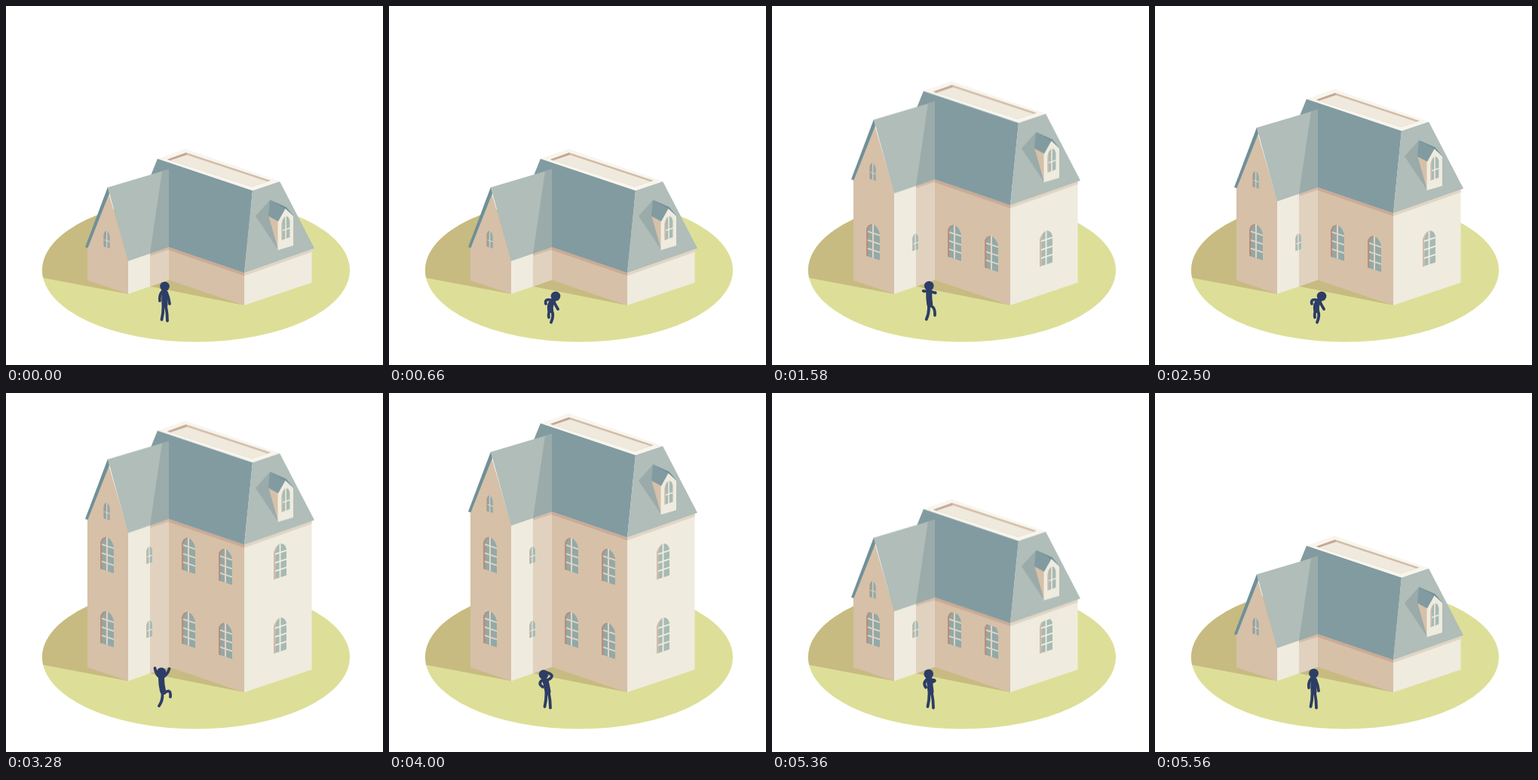
Write an HTML page that moves like this. It is 500 px wide and 475 px high and loops after 6 s.

```html
<!DOCTYPE html>
<html lang="en">
<head>
<meta charset="utf-8">
<title>Growing house</title>
<style>
  html, body { margin: 0; width: 100%; height: 100%; overflow: hidden; background: #fff; }
  svg { display: block; width: 100%; height: 100%; }

  .rise { animation: rise 6s infinite; }
  @keyframes rise {
    0%, 17% { transform: translateY(0); animation-timing-function: cubic-bezier(.65, 0, .35, 1); }
    25.167% { transform: translateY(-98px); animation-timing-function: ease-in-out; }
    27.667%, 49.333% { transform: translateY(-79px); animation-timing-function: cubic-bezier(.65, 0, .35, 1); }
    57.5% { transform: translateY(-167px); animation-timing-function: ease-in-out; }
    60%, 86% { transform: translateY(-162px); animation-timing-function: cubic-bezier(.33, .1, .4, 1); }
    92.667%, 100% { transform: translateY(0); }
  }

  .person path {
    fill: none; stroke: #2d3d66; stroke-linecap: round; stroke-linejoin: round;
    animation: pose 6s ease-in-out infinite;
  }
  @keyframes pose {
    0%, 4.333%, 29%, 35%, 92.667%, 100% { d: var(--stand); }
    11%, 17%, 41.667%, 49.333% { d: var(--crouch); }
    21%, 53.333% { d: var(--leap); animation-timing-function: linear; }
    22.333%, 23.667%, 54.667%, 56% { d: var(--top); }
    60% { d: var(--stand); }
    66.667%, 86% { d: var(--think); }
  }
  .person .head {
    stroke-width: 12.6;
    --stand: path("M210.5 371h.01");
    --crouch: path("M221 384h.01");
    --leap: path("M208 371.5h.01");
    --top: path("M206 369.5h.01");
    --think: path("M205 372.5h.01");
  }
  .person .torso {
    stroke-width: 8;
    --stand: path("M210.5 380Q210 387 210.5 395");
    --crouch: path("M217 391Q213 395 214 402");
    --leap: path("M207 380Q204 388 209 396");
    --top: path("M206 377Q206 386 208 394");
    --think: path("M207.5 381Q209 386 210.5 395");
  }
  .person .limbs {
    stroke-width: 3.8;
    --stand: path("M207 378Q203 383 204 390M213 379Q216 386 217 394M208.5 397Q208.5 407 206.5 415M212 397Q214 407 214 416.5");
    --crouch: path("M215 389Q206 387 208 394M219 392Q221 396 224 401M213 403Q211 407 212 412M216 403Q219 410 215 418.5");
    --leap: path("M205 378Q199 377 195.5 368M210 378Q216 379 221 370M208 398Q206 404 203.5 413M211 397Q218 402 215 412");
    --top: path("M204 376Q199 373 197.5 364M208 376Q214 373 216.5 365M207 395Q209 405 203 414M210 397Q219 390 218 402");
    --think: path("M205 379Q196 384 204 389M210 380Q222 374 210 370M208.5 397Q208.5 407 206.5 415M212 397Q214 407 214 416.5");
  }

  .tan { --pane: #92a9a8; --reveal: #b39282; --bar: #e2d3c1; }
  .pale { --pane: #a6bab3; --reveal: #cfbbaa; --bar: #f0ebe0; }
</style>
</head>
<body>
<svg viewBox="0 0 500 475">
  <defs>
    <clipPath id="lawn"><ellipse cx="252" cy="349.5" rx="204" ry="95"/></clipPath>
    <clipPath id="ground">
      <path d="M90 0V363H108L162 381L216 362.5L316 396L405.5 366H420V0Z"/>
    </clipPath>
    <!-- windows appear a little below the eaves -->
    <clipPath id="eaves">
      <path class="rise" d="M100 329L162 349L216 331L316 365L416 332V700H100Z"/>
    </clipPath>

    <g id="tall">
      <path fill="var(--pane)" d="M-9 45V10Q-7 2 0 0Q7 2 9 10V45Z"/>
      <path fill="var(--reveal)" d="M-9 45V10Q-7 2 0 0Q-5 4 -6 10V45Z"/>
      <path stroke="var(--bar)" stroke-width="2" d="M0 0V45M-7 12H9M-7 23.5H9M-7 34.5H9"/>
    </g>
    <g id="small">
      <path fill="var(--pane)" d="M-4 22V6Q-3 1 0 0Q3 1 4 6V22Z"/>
      <path fill="var(--reveal)" d="M-4 22V6Q-3 1 0 0Q-2.5 2 -2.7 6V22Z"/>
      <path stroke="var(--bar)" stroke-width="1.2" d="M0 0V22M-3 13H4"/>
    </g>
    <g id="floor">
      <g class="tan">
        <use href="#tall" transform="matrix(1 .33 0 1 134 288.5)"/>
        <use href="#tall" transform="matrix(1 .33 0 1 242 289.5)"/>
        <use href="#tall" transform="matrix(1 .33 0 1 291 304)"/>
      </g>
      <g class="pale">
        <use href="#small" transform="matrix(1 -.33 0 1 190 301)"/>
        <use href="#tall" transform="matrix(.94 -.31 0 1 363.5 297)"/>
      </g>
    </g>
  </defs>

  <g clip-path="url(#lawn)">
    <path fill="#dddf98" d="M0 200H500V475H0Z"/>
    <path fill="#c7bb81" d="M40 358L162 381V200H40Z"/>
  </g>
  <path fill="#c7bb81" d="M191 371L216 362L316 396Z"/>

  <g clip-path="url(#ground)">
    <g class="rise">
      <!-- walls -->
      <path fill="#d6c0a8" d="M108 320L136 247L162.3 337V600H108Z"/>
      <path fill="#efebdf" d="M162 337L192 327V600H162Z"/>
      <path fill="#e1d2c0" d="M191 327L216.3 319V600H191Z"/>
      <path fill="#d6c0a8" d="M216 319L316.3 353V600H216Z"/>
      <path fill="#efebdf" d="M316 353L405.5 321V600H316Z"/>
      <path fill="#d5bba8" d="M191 327L216 319V322.5L191 330.5Z"/>
      <path fill="#cbaa96" d="M216 319L316 353V357L216 323Z"/>
      <path fill="#e0d5c5" d="M316 353L405.5 321V325.5L316 357Z"/>

      <!-- main roof -->
      <path fill="#819ba1" d="M201 202L327 244L316 353L216 319L190 229Z"/>
      <path fill="#b0bdb8" d="M327 244L363 232L409 320.5L316 353Z"/>
      <path fill="#f8f5ed" d="M201 202L238 189L363.5 232L327 244.3Z"/>
      <path fill="#d1bca7" d="M214 203L239 194L351 231L326 239Z"/>
      <path fill="#c5a695" d="M214 203L239 194L240 197L218 204.5Z"/>
      <path fill="#efeadd" d="M218 204.3L240 197L347 232.3L326 239Z"/>

      <!-- wing roof -->
      <path fill="#b0bdb8" d="M135 240L216 216V319L162 337.5Z"/>
      <path fill="#9aabaa" d="M207 218.7L216 216V319L191 327.6Z"/>
      <path fill="#6f9098" d="M105 319L135 239.5L137 248L108.5 320Z"/>

      <!-- dormer -->
      <path fill="#9aabaa" d="M350 257L331 278L361 322.5V285Z"/>
      <path fill="#d6c0a8" d="M348 277L361 284V322.5Z"/>
      <path fill="#efebdf" d="M360.5 285L371 267L381 278V317L360.5 323Z"/>
      <path fill="#819ba1" d="M350 256.5L371 267L361 285L348 278Z"/>
      <path fill="#708f97" d="M350 256.5L371.5 266L382.5 279L371 268.5Z"/>

      <use class="tan" href="#small" transform="matrix(1 .33 0 1 133.7 297.5)"/>
      <use class="pale" href="#small" transform="matrix(1.35 -.45 0 1.36 371 278)"/>
    </g>
  </g>

  <g clip-path="url(#eaves)">
    <use href="#floor"/>
    <use href="#floor" y="-98"/>
  </g>

  <g class="person">
    <path class="limbs"/>
    <path class="torso"/>
    <path class="head"/>
  </g>
</svg>
<script>
  // Hold every drawing for 40 ms; the second half of the loop is off by half a step.
  const loop = 6000, step = 40;
  const moves = document.getAnimations();
  moves.forEach(move => move.pause());

  function tick() {
    const t = performance.now() % loop;
    const shift = t < 3000 ? 20 : 0;
    const held = Math.max(0, Math.floor((t - shift) / step) * step + shift);
    moves.forEach(move => { move.currentTime = held; });
    requestAnimationFrame(tick);
  }
  tick();
</script>
</body>
</html>
```
